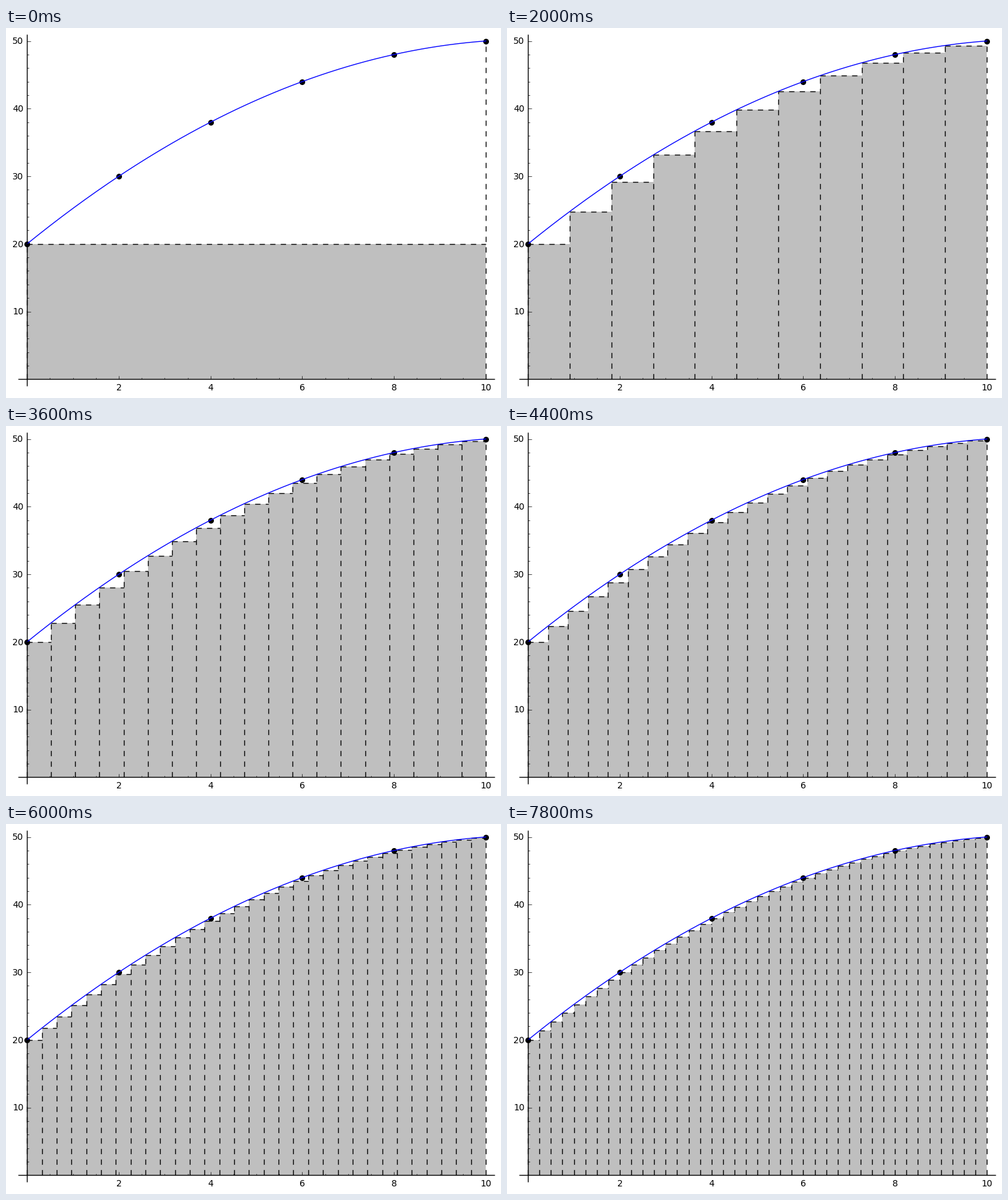
Recreate the animation shown at these times as a matplotlib script. Size 781 by 584 pixels, loop 8 s.

```python
import numpy as np
import matplotlib.pyplot as plt
from matplotlib.animation import FuncAnimation

W, H, DPI = 781, 584, 100
X0, XS = 33.2, 72.38      # pixel of x = 0, pixels per unit
Y0, YS = 554.3, 10.676
STEPS = 40

plt.rcParams["font.family"] = "DejaVu Sans"


def f(x):
    return 20 + 5.5 * x - 0.25 * x ** 2


def px(x):
    return X0 + XS * np.asarray(x, float)


def py(y):
    return Y0 - YS * np.asarray(y, float)


fig = plt.figure(figsize=(W / DPI, H / DPI), dpi=DPI, facecolor="white")
ax = fig.add_axes([0, 0, 1, 1])
ax.set_xlim(0, W)
ax.set_ylim(H, 0)
ax.axis("off")


def stroke(xs, ys, width=1.0, z=5):
    ax.plot(xs, ys, color="black", lw=width, zorder=z, solid_capstyle="butt")


def draw_axes():
    stroke([px(-0.2), px(10.2)], [Y0, Y0])
    stroke([X0, X0], [py(-1), py(51)])
    for i in range(1, 21):
        size = 2.8 if i % 4 else 5.6
        stroke([px(i / 2)] * 2, [Y0, Y0 - size], 0.5)
    for y in range(2, 51, 2):
        size = 2.8 if y % 10 else 5.6
        stroke([X0, X0 + size], [py(y)] * 2, 0.5)
    for i in range(1, 6):
        ax.text(px(2 * i), 572, str(2 * i), size=10, ha="center", va="baseline")
        ax.text(X0 - 5.6, py(10 * i) + 4.9, str(10 * i), size=10,
                ha="right", va="baseline")


def dashed():
    return ax.plot([], [], color="black", lw=1, ls=(0, (6, 6)),
                   dash_capstyle="butt", zorder=2)[0]


draw_axes()
area = ax.fill([X0, X0, X0], [Y0, Y0, Y0], color="0.75", lw=0, zorder=1)[0]
tops = [dashed() for _ in range(STEPS)]
sides = [dashed() for _ in range(STEPS + 1)]

dots = np.arange(0, 11, 2)
ax.scatter(px(dots), py(f(dots)), s=30, c="black", edgecolors="black",
           linewidths=1, zorder=3)
curve = np.linspace(0, 10, 200)
ax.plot(px(curve), py(f(curve)), color="blue", lw=1, zorder=4)


def update(frame):
    n = frame + 1
    edges = np.linspace(0, 10, n + 1)
    xs, ys = px(edges), py(f(edges))

    outline_x = np.concatenate([[xs[0]], np.repeat(xs, 2)[1:-1], [xs[-1]]])
    outline_y = np.concatenate([[Y0], np.repeat(ys[:-1], 2), [Y0]])
    area.set_xy(np.column_stack([outline_x, outline_y]))

    for i, line in enumerate(tops):
        line.set_visible(i < n)
        if i < n:
            line.set_data(xs[i:i + 2], [ys[i], ys[i]])
    for i, line in enumerate(sides):
        line.set_visible(i <= n)
        if i <= n:
            line.set_data([xs[i], xs[i]], [Y0, ys[i]])
    return [area, *tops, *sides]


anim = FuncAnimation(fig, update, frames=STEPS, interval=200,
                     repeat=True, repeat_delay=0, blit=False)
plt.show()
```
